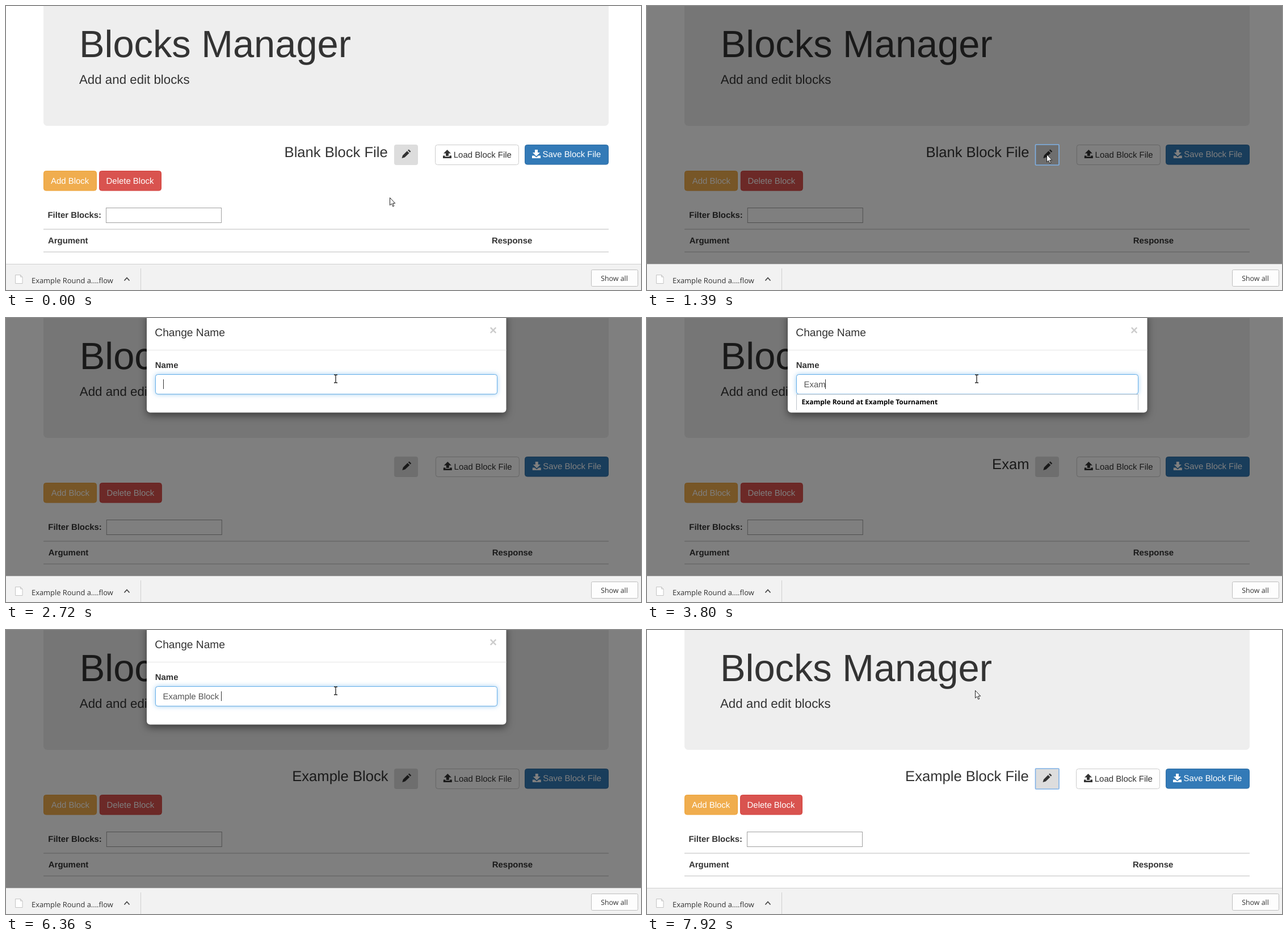
These frames come from a looping animation (1119 by 500 pixels, 8000 ms). An HTML page:

```html
<!DOCTYPE html>
<html lang="en">
<head>
<meta charset="utf-8">
<title>Blocks Manager</title>
<style>
  html, body { margin: 0; width: 100%; height: 100%; overflow: hidden; background: #fff; }
  svg { display: block; width: 100%; height: 100%; }
  text { font: 14.93px "Liberation Sans", Arial, sans-serif; fill: #333; white-space: pre; text-rendering: geometricPrecision; }
  .b { font-weight: bold; }
  .w { fill: #fff; }
  .ui { font-family: "Open Sans", "Noto Sans", sans-serif; }
  .h1 { font-size: 66.8px; }
  .lead { font-size: 22.3px; }
  .h3 { font-size: 25.6px; }
  .h4 { font-size: 19.2px; }
  #field { fill: #555; }
  #panel { filter: drop-shadow(0 5px 7px rgba(0, 0, 0, .5)); }
  #focus { filter: drop-shadow(0 0 4px rgba(102, 175, 233, .6)); }
</style>
</head>
<body>
<svg viewBox="0 0 1119 500">
  <rect width="1119" height="500" fill="#fff"/>
  <path d="M66 0H1062V204.500a6.500 6.500 0 0 1-6.500 6.500H72.500a6.500 6.500 0 0 1-6.500-6.500z" fill="#eee"/>
  <path d="M66 392h996v2H66zM66 432h996v2H66z" fill="#ddd"/>
  <rect x="66.500" y="290.500" width="93" height="34.500" rx="4" fill="#f0ad4e" stroke="#eea236"/>
  <rect x="914.500" y="244.500" width="147" height="34.500" rx="4" fill="#337ab7" stroke="#2e6da4"/>
  <rect x="684" y="244" width="42" height="36" rx="4" fill="#ddd"/>

  <g id="page">
    <rect x="164.500" y="290.500" width="109" height="34.500" rx="4" fill="#d9534f" stroke="#d43f3a"/>
    <rect x="756.500" y="244.500" width="147" height="35" rx="4" fill="#fff" stroke="#ccc"/>
    <rect x="176.500" y="355.500" width="203" height="26" fill="#fff" stroke="#a0a0a0"/>
    <text class="h1" x="129" y="90">Blocks Manager</text>
    <text class="lead" x="129" y="137">Add and edit blocks</text>
    <text class="h3" id="heading" x="672.700" y="266" text-anchor="end"></text>
    <text x="788.800" y="267">Load Block File</text>
    <text class="w" x="945.500" y="266">Save Block File</text>
    <text class="w" x="79" y="313">Add Block</text>
    <text class="w" x="176.600" y="313">Delete Block</text>
    <text class="b" x="73.500" y="373">Filter Blocks:</text>
    <text class="b" x="74" y="418">Argument</text>
    <text class="b" x="856" y="418">Response</text>
    <path d="M697.500 268L699 263L706.800 255.200L710.500 258.900L702.600 266.600zM708 254.100L709.800 252.500L713.400 256L711.700 257.700z" fill="#333"/>
    <path d="M777.500 253L784 259.500H780V264H775V259.500H771zM770 263.500H773.500V265.300H781.500V263.500H785V268H770z" fill="#333"/>
    <path d="M932 253H937V258H941L934.500 264.500L928 258H932zM927 263.500H931L934.500 266.500L938 263.500H942V268H927z" fill="#fff"/>
  </g>

  <rect id="dim" width="1119" height="454.500"/>
  <rect id="ring" x="684.500" y="244" width="41.500" height="36" rx="1" fill="none" stroke="#7fb1e6" stroke-width="1.600"/>

  <g id="modal">
    <rect id="panel" x="248" y="-10" width="633.500" height="176.500" rx="6" fill="#fff"/>
    <path d="M248 56.500H881.500" stroke="#e5e5e5"/>
    <text class="h4" x="262.300" y="32">Change Name</text>
    <text class="b" x="852" y="29" style="font-size:22.4px;fill:#ccc">×</text>
    <text class="b" x="262.800" y="88">Name</text>
    <rect x="263.500" y="99.500" width="602" height="34.500" rx="4" fill="#fff" stroke="#ccc"/>
    <rect id="focus" x="263.500" y="99.500" width="602" height="34.500" rx="4" fill="#fff" stroke="#66afe9"/>
    <rect id="select" x="276" y="108" width="107" height="17" fill="#3390ff"/>
    <text id="field" x="276.500" y="122"></text>
    <rect id="caret" y="108" width="1" height="17" fill="#333"/>
    <g id="hint">
      <path d="M263 134.500H866V162H263z" fill="#fff"/>
      <path d="M263.500 162V134.500H865.500V162" fill="none" stroke="#bcc3ca"/>
      <text class="ui b" x="272.500" y="151.500" style="font-size:12px;fill:#000">Example Round at Example Tournament</text>
    </g>
  </g>

  <rect y="454" width="1119" height="46" fill="#f2f2f2"/>
  <path d="M0 454.500H1119M237.500 462V500" stroke="#cfcfcf"/>
  <path d="M16.500 473.500H25.500L29 477V488.500H16.500zM25.500 473.500V477H29" fill="#fff" stroke="#c4c4c4"/>
  <text class="ui" x="45" y="488" style="font-size:12.9px">Example Round a....flow</text>
  <path d="M208.500 483.500L213 478.500L217.500 483.500" fill="none" stroke="#444" stroke-width="1.700"/>
  <rect x="1031.500" y="464.500" width="82" height="29" rx="2" fill="#fdfdfd" stroke="#bdbdbd"/>
  <text class="ui" x="1072" y="484" text-anchor="middle" style="font-size:12.4px">Show all</text>

  <path id="arrow" d="M.5 .5V13.800L3.500 11L5.800 16L7.800 15.100L5.600 10.300H9.700z" fill="#fff" stroke="#222"/>
  <path id="beam" d="M-3 -7H-1L0 -6L1 -7H3M0 -6V6M-3 7H-1L0 6L1 7H3" fill="none" stroke="#222" stroke-width="1.300"/>
</svg>
<script>
const LOOP = 8000, OLD = "Blank Block File", NEW = "Example Block File";
const keys = [3250, 3570, 3720, 3800, 4450, 4680, 4760, 5130, 5360,
              5590, 5820, 5980, 6130, 6360, 6600, 6760, 6910, 7060];
// Pointer stops after the edit button is pressed: time, x, y
const stops = [[1775, 694, 238], [1860, 668, 200], [1945, 632, 158], [2030, 604, 124],
               [2080, 586, 105], [2150, 581, 107], [7290, 579, 106], [7920, 578, 106]];

const el = {};
document.querySelectorAll("[id]").forEach(e => el[e.id] = e);
const set = (e, name, value) => e.setAttribute(name, value);
const show = (e, on) => set(e, "visibility", on ? "visible" : "hidden");
const move = (e, x, y) => set(e, "transform", `translate(${x} ${y})`);
const clamp = v => Math.min(1, Math.max(0, v));
const hold = (t, from, step) => from + Math.floor((t - from) / step) * step;
const within = (t, a, b) => t >= a && t < b;

function pointer(t) {
  if (t >= stops[0][0]) return stops.filter(s => s[0] <= t).pop().slice(1);
  const p = clamp((hold(t, 380, 77) + 77 - 380) / 847);
  const k = (1 - Math.cos(Math.PI * p)) / 2;
  return [676 + 28 * k, 337 - 76 * k];
}

function dimming(t) {
  if (t < 1240) return 0;
  if (t < 7382) return Math.min(.5, .227 + (hold(t, 1240, 75) - 1240) / 300);
  return Math.max(0, .5 - .17 * Math.floor((t - 7382) / 76));
}

function modalPose(t) {
  if (t >= 7385) return [0, 0];
  if (t >= 7290) return [.5, -18];
  const since = hold(t, 1240, 75) - 1420;
  return [clamp(since / 150), -43 * (1 - clamp(since / 300)) ** 2];
}

function draw(t) {
  const dim = dimming(t);
  set(el.dim, "opacity", dim);
  move(el.page, dim ? .8 : 0, 0);
  show(el.ring, within(t, 1150, 2400) || t >= 7610);

  const typed = keys.filter(k => k <= t).length;
  const value = t < 2720 ? OLD : NEW.slice(0, typed);
  el.heading.textContent = value.trim();
  el.field.textContent = value;

  const [alpha, y] = modalPose(t);
  set(el.modal, "opacity", alpha);
  move(el.modal, 0, y);
  set(el.focus, "opacity", clamp((hold(t, 2400, 78) - 2350) / 150));

  const selected = within(t, 2560, 2720);
  show(el.select, selected);
  el.field.style.fill = selected ? "#fff" : "#555";
  show(el.caret, t >= 2400 && !selected && t < 7290);
  set(el.caret, "x", Math.floor(276.5 + (value ? el.field.getComputedTextLength() : .5)));
  show(el.hint, within(t, 2790, 5360));

  const inField = within(t, 2030, 7290), [px, py] = pointer(t);
  show(el.beam, inField);
  show(el.arrow, !inField);
  move(inField ? el.beam : el.arrow, px, py);
}

function tick() {
  draw(performance.now() % LOOP);
  requestAnimationFrame(tick);
}
tick();
</script>
</body>
</html>
```
